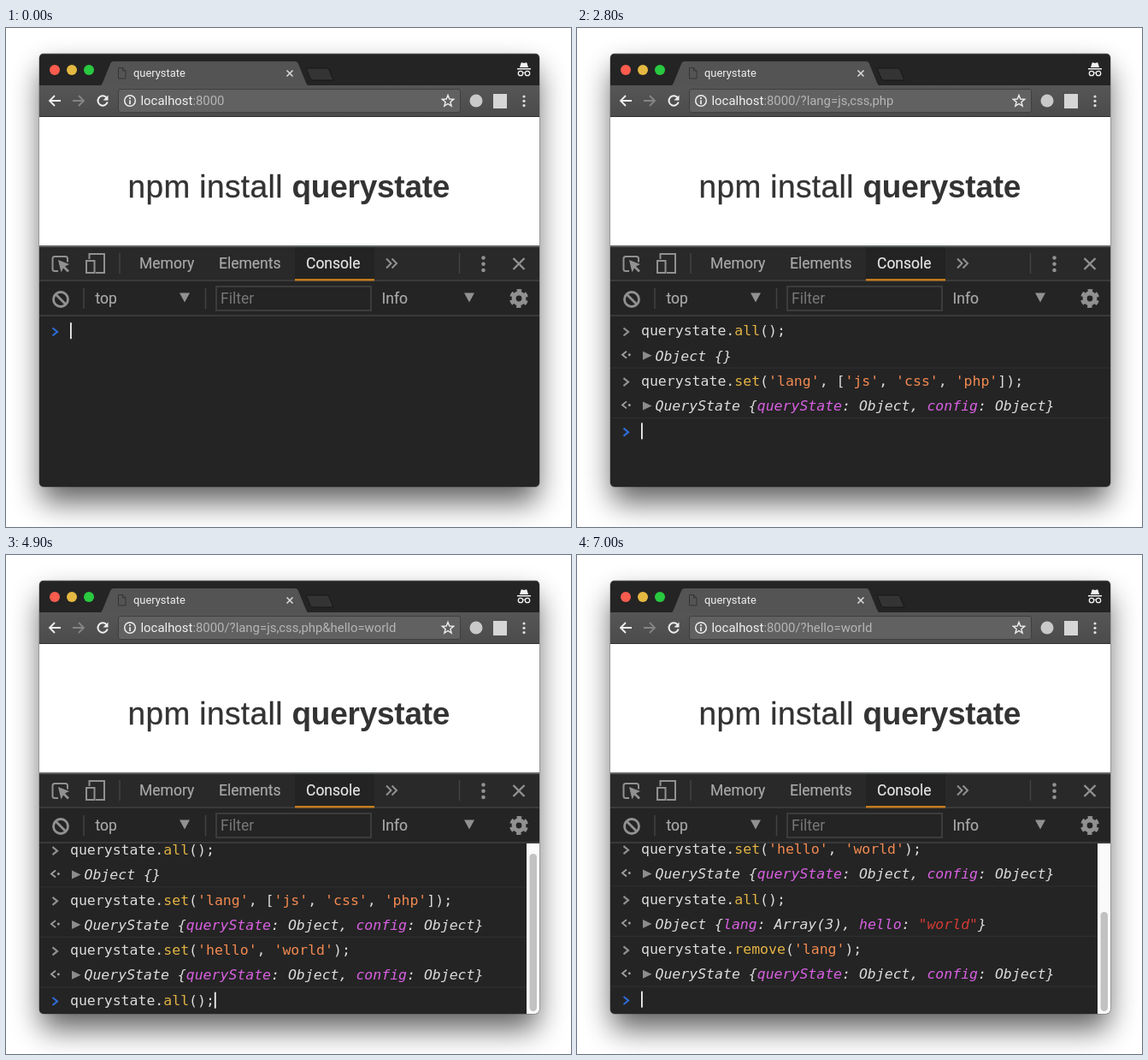
These frames come from a looping animation (661x583 px, 8000 ms). An HTML page:

```html
<!DOCTYPE html>
<html lang="en">
<head>
<meta charset="utf-8">
<title>querystate</title>
<style>
  html, body { margin: 0; width: 100%; height: 100%; overflow: hidden; background: #fff; }
  svg { display: block; width: 100%; height: 100%; }
  text { white-space: pre; }
  .ui { font: 17.5px Roboto, sans-serif; fill: #a9a9a9; stroke: #a9a9a9; stroke-width: .2; }
  .hero { font: 37px "Liberation Sans", Arial, sans-serif; fill: #333; }
  .code { font: 16.5px "DejaVu Sans Mono", monospace; fill: #dcdcdc; }
  .out { font-style: italic; }
  .fn { fill: #e2b443; }
  .str { fill: #f28a51; }
  .key { fill: #d960e2; }
  .val { fill: #d53b35; }
  .line { fill: none; stroke-width: 2; }
</style>
</head>
<body>
<svg viewBox="0 0 661 583">
  <defs>
    <filter id="blur" x="-20%" y="-20%" width="140%" height="140%"><feGaussianBlur stdDeviation="17"/></filter>
    <clipPath id="frame"><rect x="39" y="30" width="585" height="506" rx="5"/></clipPath>
    <clipPath id="pane"><rect x="39" y="337" width="585" height="199"/></clipPath>
    <linearGradient id="bar" x2="0" y2="1"><stop stop-color="#565656"/><stop offset="1" stop-color="#4b4b4b"/></linearGradient>
  </defs>
  <rect width="661" height="583" fill="#fff"/>
  <rect x="41" y="48" width="581" height="506" rx="8" opacity=".62" filter="url(#blur)"/>
  <rect x="38.5" y="29.5" width="586" height="507" rx="5.5" fill="#000" opacity=".35"/>

  <g clip-path="url(#frame)">
    <rect x="39" y="30" width="585" height="506" fill="#242424"/>

    <!-- tab strip -->
    <rect x="39" y="30" width="585" height="1" fill="#444"/>
    <circle cx="57" cy="49" r="6" fill="#fb5c4e"/>
    <circle cx="77" cy="49" r="6" fill="#e5b941"/>
    <circle cx="97" cy="49" r="6" fill="#29c940"/>
    <path d="M351 47H375Q377 47 378 49L383 61H359Q357 61 356 59Z" fill="#343434" stroke="#171717"/>
    <rect x="39" y="67" width="585" height="37" fill="url(#bar)"/>
    <path d="M109 68Q112 67 113 64L122 42Q123 39 126 39H338Q341 39 342 42L351 64Q352 67 355 68Z" fill="#545454"/>
    <path d="M131.5 46.5h5l3.500 3.500v9h-8.500zM136.500 46.500v3.500h3.500" fill="none" stroke="#343434"/>
    <text x="149" y="57" font-family="Roboto, sans-serif" font-size="12.9" fill="#f0f0f0">querystate</text>
    <path d="M328.500 49.500l7 7m0-7l-7 7" class="line" stroke="#d8d8d8" style="stroke-width:1.6"/>
    <g fill="#f2f2f2">
      <path d="M601 46l1.500-5q.3-1 1.500-.6l2 .5 2-.5q1.200-.4 1.500.6l1.500 5z"/>
      <rect x="598" y="47" width="16" height="1.500"/>
      <path d="M604.500 52.500q1.500-1 3 0" fill="none" stroke="#f2f2f2"/>
    </g>
    <g fill="none" stroke="#f2f2f2" stroke-width="1.300">
      <circle cx="602" cy="53" r="2.700"/><circle cx="610" cy="53" r="2.700"/>
    </g>

    <!-- toolbar -->
    <path d="M64 85H51.500M57 79l-6 6 6 6" class="line" stroke="#efefef" style="stroke-width:1.8"/>
    <path d="M78 85H90.500M85 79l6 6-6 6" class="line" stroke="#858585" style="stroke-width:1.8"/>
    <path d="M117.300 81a5.700 5.700 0 1 0 1.400 5.500" class="line" stroke="#efefef"/>
    <path d="M119.500 78.500v6h-6z" fill="#efefef"/>
    <rect x="131.500" y="71.500" width="400" height="27" rx="2.500" fill="#616161" stroke="#3f3f3f"/>
    <circle cx="145" cy="85" r="6.300" class="line" stroke="#efefef" style="stroke-width:1.5"/>
    <path d="M145 81v2m0 1.300v4.700" class="line" stroke="#efefef" style="stroke-width:1.700"/>
    <text x="157.500" y="90" font-family="Roboto, sans-serif" font-size="14.900" fill="#f0f0f0">localhost<tspan id="url" fill="#b5b5b5"></tspan></text>
    <path id="star" fill="none" stroke="#efefef" stroke-width="1.400"/>
    <circle cx="550" cy="85" r="7.500" fill="#c9c9c9"/>
    <rect x="570" y="77" width="16" height="17" fill="#d6d6d6"/>
    <g fill="#dedede"><circle cx="606" cy="80" r="1.600"/><circle cx="606" cy="85.300" r="1.600"/><circle cx="606" cy="90.600" r="1.600"/></g>
    <rect x="39" y="103" width="585" height="1" fill="#303030"/>

    <!-- page -->
    <rect x="39" y="104" width="585" height="150" fill="#fff"/>
    <text class="hero" x="142.500" y="198" letter-spacing=".4" stroke="#333" stroke-width=".3">npm install</text>
    <text class="hero" x="334.500" y="198" letter-spacing="-.25" style="font-weight:700">querystate</text>

    <!-- panel tabs -->
    <rect x="39" y="254" width="585" height="41" fill="#292929"/>
    <rect x="39" y="254" width="585" height="2" fill="#5f6462"/>
    <rect x="39" y="294" width="585" height="2" fill="#3a3a3a"/>
    <rect x="338" y="256" width="93" height="37" fill="#232323"/>
    <rect x="338" y="293" width="93" height="2.500" fill="#c17a1c"/>
    <g class="line" stroke="#919191">
      <path d="M61 284h-4q-2.500 0-2.500-2.500v-12q0-2.500 2.500-2.500h12.500q2.500 0 2.500 2.500v4"/>
      <path d="M97.500 270v-6h17.500v22h-10"/><rect x="94" y="272" width="9.500" height="14"/>
      <path d="M445 269.500l5.500 5.500-5.500 5.500m6.500-11l5.500 5.500-5.500 5.500"/>
      <path d="M593.500 269l13 13m0-13l-13 13" stroke-width="2.400"/>
    </g>
    <path d="M61 271l13 5-5 2.500 5 5-2 2-5-5-2.500 5z" fill="#919191"/>
    <g fill="#919191"><circle cx="558.500" cy="268.500" r="2.300"/><circle cx="558.500" cy="275.700" r="2.300"/><circle cx="558.500" cy="283" r="2.300"/></g>
    <path d="M133 263v24M530.500 263v24M91 304v24M233.500 304v24" stroke="#424242" stroke-width="1.500"/>
    <g class="ui">
      <text x="156" y="281">Memory</text>
      <text x="249" y="281">Elements</text>
      <text x="351" y="281" style="fill:#e6e6e6;stroke:#e6e6e6">Console</text>
    </g>

    <!-- filter row -->
    <g class="line" stroke="#919191">
      <circle cx="64" cy="317" r="8.500" stroke-width="2.800"/><path d="M58 311l12 12" stroke-width="2.800"/>
    </g>
    <path d="M203 309.500h12l-6 11zM536 309.500h12l-6 11z" fill="#919191"/>
    <rect x="246" y="302" width="181" height="28" fill="#222" class="line" stroke="#3c3c3c"/>
    <g class="ui">
      <text x="104.500" y="322">top</text>
      <text x="251" y="322" style="fill:#777;stroke:none">Filter</text>
      <text x="439.500" y="322">Info</text>
    </g>
    <g fill="none" stroke="#919191">
      <circle cx="600" cy="316" r="5.900" stroke-width="5"/>
      <circle cx="600" cy="316" r="9" stroke-width="4" stroke-dasharray="5.200 4.225" transform="rotate(14 600 316)"/>
    </g>
    <rect x="39" y="335" width="585" height="2" fill="#393939"/>

    <g clip-path="url(#pane)">
      <g id="log"></g>
      <g id="scroll">
        <rect x="609" y="337" width="15" height="199" fill="#fafafa"/>
        <rect id="thumb" x="612.500" width="8.500" rx="4.200" fill="#c2c2c2"/>
      </g>
    </g>
  </g>
</svg>
<script>
const $ = id => document.getElementById(id);
const LOOP = 8000, STEP = 700, LAST = 10;
const CHAR = 9.933, ROW = 29.3, TOP = 353.5;

const instance = 'QueryState {queryState: Object, config: Object}';
const langUrl = ':8000/?lang=js,css,php';
const session = [
  { cmd: 'querystate.all();', out: 'Object {}' },
  { cmd: "querystate.set('lang', ['js', 'css', 'php']);", out: instance },
  { cmd: "querystate.set('hello', 'world');", out: instance },
  { cmd: 'querystate.all();', out: 'Object {lang: Array(3), hello: "world"}' },
  { cmd: "querystate.remove('lang');", out: instance }
];
// indexed by the number of finished commands
const urls = [':8000', ':8000', langUrl, langUrl + '&hello=world', langUrl + '&hello=world', ':8000/?hello=world'];
const offsets = [0, 0, 0, 9.3, 69, 127.5];
const thumbs = [0, 0, 0, 349, 391, 417];
const cursorOff = [2, 9];

const span = (cls, s) => `<tspan class="${cls}">${s}</tspan>`;
const paintCmd = s => s.replace(/'\w+'|\.\w+/g, m =>
  m[0] === '.' ? '.' + span('fn', m.slice(1)) : span('str', m));
const paintOut = s => s.replace(/"\w+"|\w+(?=:)/g, m => span(m[0] === '"' ? 'val' : 'key', m));
const text = (x, y, cls, body) =>
  `<text class="code ${cls}" x="${x}" y="${y + 5.7}">${body}</text>`;
const chevron = (y, color) =>
  `<path d="M54.500 ${y - 3}l5.500 4.500-5.500 4.500" fill="none" stroke="${color}" stroke-width="2.200"/>`;

function inputRow(y, cmd, color) {
  return chevron(y, color) + text(75, y, '', paintCmd(cmd));
}

function outputRow(y, out) {
  return `<path d="M58 ${y - 5}l-5 4 5 4" fill="none" stroke="#a0a0a0" stroke-width="1.800"/>` +
    `<circle cx="61.300" cy="${y - 1}" r="1.500" fill="#a0a0a0"/>` +
    `<path d="M77 ${y - 5}l10.500 5-10.500 5z" fill="#8c8c8c"/>` +
    text(91.5, y, 'out', paintOut(out)) +
    `<rect x="39" y="${y + 13.8}" width="585" height="1" fill="#303030"/>`;
}

function render(step) {
  const done = step >> 1;
  const typed = step % 2 ? session[done].cmd : '';
  const rowY = i => TOP + ROW * i - offsets[done];
  let rows = session.slice(0, done).map((e, i) =>
    inputRow(rowY(2 * i), e.cmd, '#909090') + outputRow(rowY(2 * i + 1), e.out)).join('');
  const y = rowY(2 * done);
  rows += inputRow(y, typed, '#2e6bd6');
  if (!cursorOff.includes(step))
    rows += `<rect x="${75 + typed.length * CHAR}" y="${y - 9.3}" width="1.800" height="19" fill="#f2f2f2"/>`;
  $('log').innerHTML = rows;
  $('url').textContent = urls[done];
  $('scroll').style.display = thumbs[done] ? '' : 'none';
  $('thumb').setAttribute('y', thumbs[done]);
  $('thumb').setAttribute('height', 533 - thumbs[done]);
}

const starPoints = Array.from({ length: 10 }, (_, i) => {
  const r = i % 2 ? 3 : 7, a = i * Math.PI / 5;
  return `${517 + r * Math.sin(a)} ${85.5 - r * Math.cos(a)}`;
});
$('star').setAttribute('d', `M${starPoints.join('L')}Z`);

let shown = -1;
function tick() {
  const step = Math.min(LAST, Math.floor(performance.now() % LOOP / STEP));
  if (step !== shown) render(shown = step);
  requestAnimationFrame(tick);
}
tick();
</script>
</body>
</html>
```
